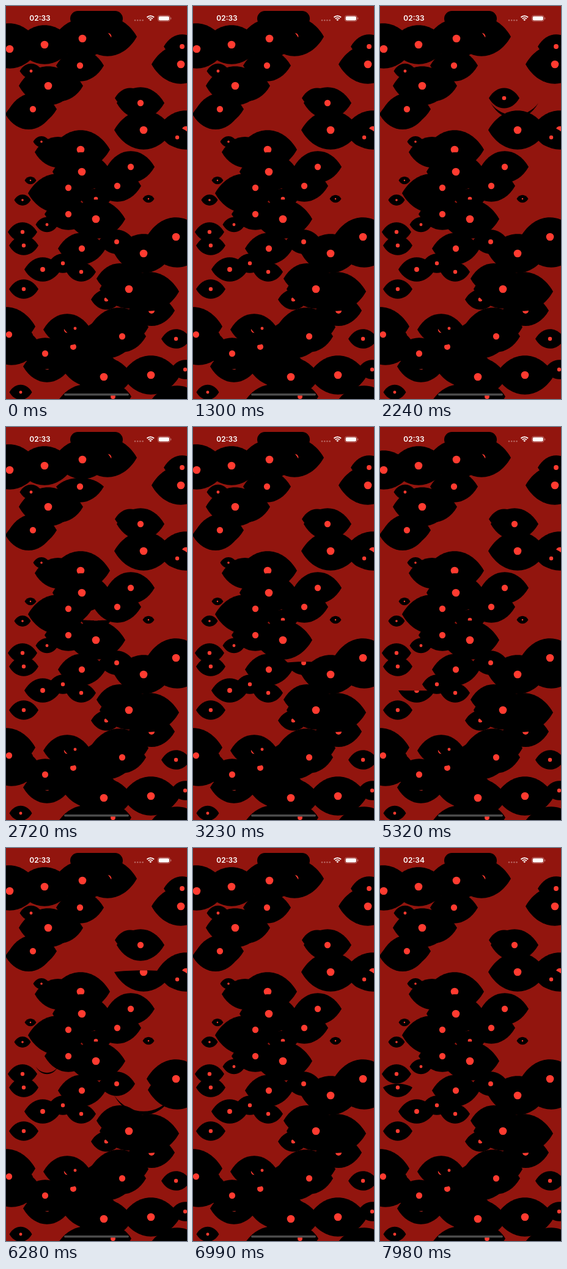
Recreate the animation shown at these times as an HTML page with a canvas. Size 296x640 px, loop 8000 ms.

```html
<!DOCTYPE html>
<html lang="en">
<head>
<meta charset="utf-8">
<title>Blinking eyes</title>
<style>
  html, body { margin: 0; width: 100%; height: 100%; overflow: hidden; background: #92150e; }
  canvas { display: block; width: 296px; height: 640px; }
</style>
</head>
<body>
<canvas id="stage"></canvas>
<script>
const W = 296, H = 640, LOOP = 8000, BLINK = 280;
const canvas = document.getElementById('stage');
const ctx = canvas.getContext('2d');
const dpr = window.devicePixelRatio || 1;
canvas.width = W * dpr;
canvas.height = H * dpr;
ctx.scale(dpr, dpr);

// Places one layer of equally wide eyes; each eye covers those placed before it.
const eyes = [];
function layer(width, ...points) {
  for (let i = 0; i < points.length; i += 2) {
    eyes.push({ x: points[i], y: points[i + 1], width, blinks: [] });
  }
}

// Half buried eyes
layer(76, 85, 238, 186, 444, 37, 176, 238, 496, 88, 130, 110, 555);
layer(50, 203, 150, 147, 314, 164, 478);
// Large to tiny
layer(96,
  166, 50, 125, 53, 5, 60, 63, 63, 6, 70, 69, 130, 286, 95, 294, 202, 225, 202,
  122, 234, 124, 270, 84, 305, 147, 347, 280, 394, 278, 376, 225, 403, 235, 465, 201, 461,
  185, 523, 165, 542, 0, 522, 9, 553, 138, 588, 160, 604, 237, 601, 130, 648, 280, 650);
layer(78,
  121, 97, 44, 168, 220, 158, 204, 262, 182, 293, 102, 296, 102, 339,
  124, 395, 190, 538, 5, 535, 100, 527, 67, 587, 64, 566);
layer(60, 288, 66, 60, 429, 181, 384, 175, 636);
layer(48, 280, 214, 93, 419, 123, 433, 27, 368, 29, 390, 29, 461, 278, 542, 293, 592);
layer(37, 41, 106, 67, 356, 24, 629, 113, 525);
layer(27, 58, 221, 27, 316);
layer(19, 40, 284, 233, 314);

function blinkAt(x, y, start) {
  eyes.find(eye => eye.x === x && eye.y === y).blinks.push(start);
}
blinkAt(280, 650, 2105);
blinkAt(220, 158, 2117);
blinkAt(181, 384, 3167);
blinkAt(60, 429, 5250);
blinkAt(5, 60, 5285);
blinkAt(225, 403, 6154);
blinkAt(67, 356, 6154);
blinkAt(225, 202, 6217);
blinkAt(29, 390, 7937);

// Three more eyes blink in every second, scattered by a fixed stride.
for (let i = 0; i < 24; i++) {
  const start = Math.floor(i / 3) * 1000 + 340 + (i % 3) * 175;
  eyes[(i * 29 + 11) % eyes.length].blinks.push(start);
}

// 1 is open, -1 is shut: the upper lid sweeps down to the lower one.
function lidAt(time, blinks) {
  const start = blinks.find(t => time > t && time < t + BLINK);
  return start === undefined ? 1 : 2 * Math.abs(1 - 2 * (time - start) / BLINK) - 1;
}

function dot(x, y, r, color) {
  ctx.fillStyle = color;
  ctx.beginPath();
  ctx.arc(x, y, r, 0, 2 * Math.PI);
  ctx.fill();
}

function bar(x, y, w, h, r, color) {
  ctx.fillStyle = color;
  ctx.beginPath();
  ctx.roundRect(x, y, w, h, r);
  ctx.fill();
}

function drawEye({ x, y, width, blinks }, time) {
  const half = width / 2, bend = width / 4, reach = width * 0.44;
  const top = y - reach * lidAt(time, blinks), bottom = y + reach;
  ctx.save();
  ctx.beginPath();
  ctx.moveTo(x - half, y);
  ctx.bezierCurveTo(x - bend, top, x + bend, top, x + half, y);
  ctx.bezierCurveTo(x + bend, bottom, x - bend, bottom, x - half, y);
  ctx.fillStyle = '#000';
  ctx.fill();
  ctx.clip();
  dot(x, y, width * 0.066, '#ff3b30');
  ctx.restore();
}

function drawWifi(x, y) {
  const from = -Math.PI * 0.75, to = -Math.PI * 0.25;
  ctx.strokeStyle = ctx.fillStyle = '#fff';
  ctx.lineWidth = 1.8;
  for (const r of [5, 8.2]) {
    ctx.beginPath();
    ctx.arc(x, y, r, from, to);
    ctx.stroke();
  }
  ctx.beginPath();
  ctx.moveTo(x, y);
  ctx.arc(x, y, 2.8, from, to);
  ctx.fill();
}

function drawPhone(time) {
  bar(105, 8, 86, 25, 12.5, '#000');
  ctx.fillStyle = '#fff';
  ctx.font = '600 12px Inter, sans-serif';
  ctx.textAlign = 'center';
  ctx.fillText(time < 7820 ? '02:33' : '02:34', 55.5, 24.4);
  for (let i = 0; i < 4; i++) dot(211 + i * 4.2, 23.2, 1.2, 'rgba(255,255,255,.35)');
  drawWifi(236.3, 24.3);
  ctx.strokeStyle = 'rgba(255,255,255,.45)';
  ctx.lineWidth = 0.8;
  ctx.beginPath();
  ctx.roundRect(248.4, 15.4, 19.8, 9.4, 3.2);
  ctx.stroke();
  bar(249.7, 16.7, 17.2, 6.8, 2, '#fff');
  bar(269.2, 18.4, 1, 3.4, 0.5, 'rgba(255,255,255,.5)');
  bar(95, 631, 106, 3.6, 1.8, '#4b4b4b');
}

function frame() {
  const time = performance.now() % LOOP;
  ctx.fillStyle = '#92150e';
  ctx.fillRect(0, 0, W, H);
  for (const eye of eyes) drawEye(eye, time);
  drawPhone(time);
  requestAnimationFrame(frame);
}
frame();
</script>
</body>
</html>
```
